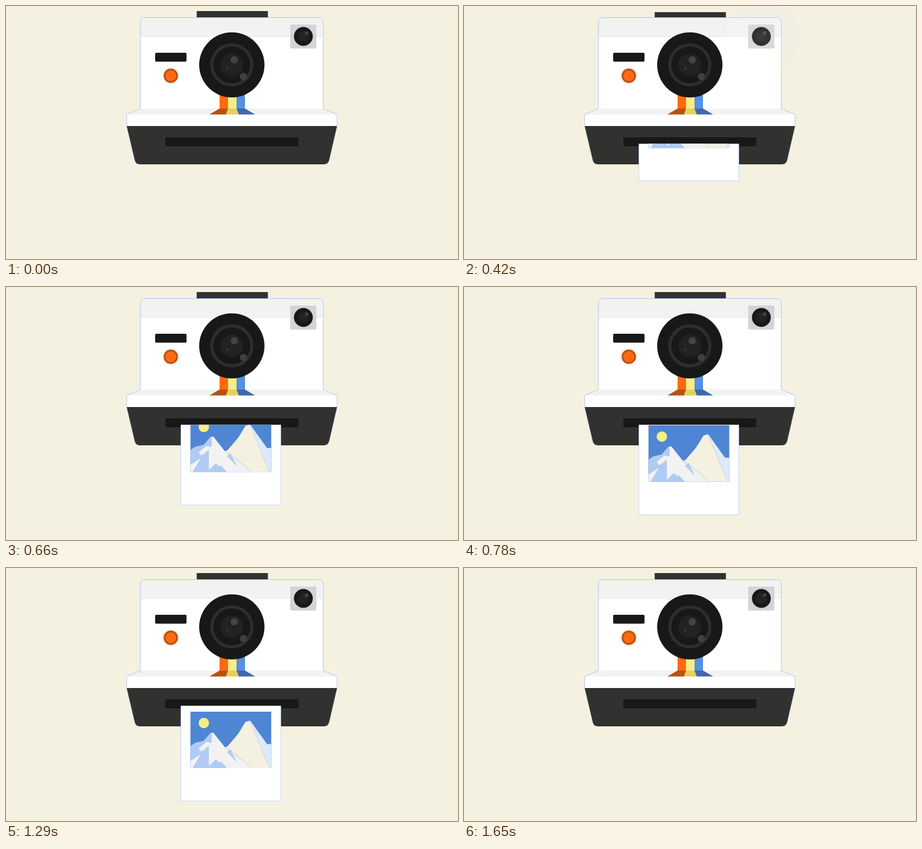
Recreate the animation shown at these times as an HTML page. Size 800 by 449 pixels, loop 2.16 s.

```html
<!DOCTYPE html>
<html lang="en">
<head>
<meta charset="utf-8">
<title>Instant camera</title>
<style>
  html, body { margin: 0; width: 100%; height: 100%; overflow: hidden; background: #f5f1e0; }
  svg { display: block; width: 100%; height: 100%; }
  .dark { fill: #31312f; }
  .black { fill: #181818; }
  .pale { fill: #f2f2f2; }
  .ice { fill: #dfe9fa; }
  .blue { fill: #b0cbf3; }
  .edge { fill: none; stroke: #8fb4f2; stroke-width: .7; }
</style>
</head>
<body>
<svg viewBox="0 0 800 449">
  <defs>
    <clipPath id="exit"><rect x="300" y="244.5" width="200" height="210"/></clipPath>
    <clipPath id="frame"><rect x="326.5" y="18.5" width="143" height="100"/></clipPath>
  </defs>

  <circle id="halo" class="ice" cx="528" cy="54" stroke="#a9c5f5" stroke-width=".7"/>
  <rect id="shutter" class="dark" x="337.5" y="9" width="126" height="16"/>

  <!-- body -->
  <path fill="#fff" d="M238 182V28.500Q238 20.500 246 20.500H553.500Q561.500 20.500 561.500 28.500V182Z"/>
  <path class="pale" d="M238 54.500V28.500Q238 20.500 246 20.500H553.500Q561.500 20.500 561.500 28.500V54.500Z"/>
  <path stroke="#e6ebf6" d="M238 54.500H561.500"/>
  <path class="pale" d="M238 182H561.500L586 192.500H213.500Z"/>
  <path fill="#fff" d="M213.500 192.500H586V213.500H213.500Z"/>
  <path class="dark" d="M213.500 213H586L572.300 272.500Q570.500 281 563 281H236.500Q229 281 227.500 272.500Z"/>
  <path class="edge" d="M213.500 213V192.500L238 182V28.500Q238 20.500 246 20.500H553.500Q561.500 20.500 561.500 28.500V182L586 192.500V213"/>
  <path class="edge" opacity=".6" d="M213.500 213L227.500 272.500Q229 281 236.500 281M586 213L572.300 272.500Q570.500 281 563 281"/>
  <rect class="black" x="282" y="233" width="235.500" height="16" rx="2"/>

  <!-- stripes -->
  <path fill="#ff6a13" d="M378 150h15v32h-15z"/>
  <path fill="#f6ee85" d="M393 150h15v32h-15z"/>
  <path fill="#5590e2" d="M408 150h15v32h-15z"/>
  <path fill="#b9500f" d="M378 182H393L389.500 192.500H360Z"/>
  <path fill="#e6d05d" d="M393 182H408L412 192.500H389.500Z"/>
  <path fill="#3f68ad" d="M408 182H423L441 192.500H412Z"/>

  <!-- controls and lens -->
  <rect class="black" x="264" y="83" width="55.500" height="15.700" rx="2"/>
  <circle fill="#f2f0ea" cx="291.700" cy="123.700" r="15.500"/>
  <circle fill="#c0500f" cx="291.700" cy="123.700" r="12.700"/>
  <circle fill="#ff6a13" cx="291.700" cy="123.700" r="9.500"/>
  <g transform="translate(399.700 104.500)">
    <circle class="black" r="57.800"/>
    <circle fill="#2e2e2e" r="38.300"/>
    <circle class="black" r="32.700"/>
    <circle fill="#222221" r="20"/>
    <circle fill="#444" cx="4.300" cy="-9" r="6.500"/>
    <circle fill="#3f3f3f" cx="20.500" cy="20.700" r="6.500"/>
    <circle fill="#3c3c3c" cx="-8" cy="6.500" r="2"/>
  </g>
  <rect fill="#d4d4d4" x="503" y="33" width="46.300" height="42.500" rx="2"/>
  <g transform="translate(526.300 54)">
    <circle class="black" r="16.700"/>
    <circle fill="#222221" r="10"/>
    <circle fill="#444" cx="6" cy="-6" r="3"/>
    <circle fill="#3a3a3a" cx="1.500" cy="-3" r="1.400"/>
  </g>

  <!-- light over the body only -->
  <clipPath id="front"><path d="M238 182V28.500Q238 20.500 246 20.500H553.500Q561.500 20.500 561.500 28.500V182Z"/></clipPath>
  <g clip-path="url(#front)"><circle id="flash" fill="#fff" cx="528" cy="54"/></g>

  <!-- print, drawn from its own top edge -->
  <g clip-path="url(#exit)">
    <g id="print">
      <rect x="309.500" width="177" height="177" fill="#fff" stroke="#a9c5f5" stroke-width=".7"/>
      <g clip-path="url(#frame)">
        <rect fill="#4f86d4" x="326" y="18" width="144" height="101"/>
        <circle fill="#f6ee85" cx="350.200" cy="38.500" r="9.200"/>
        <path class="ice" d="M431 35L433 35.500L462 76H470V119H460Z"/>
        <path fill="#f5f1e0" d="M424 36.500L431 34.500L434 37L467 119H430L387 82L392 80L410 59L414 53Z"/>
        <path class="blue" d="M326 80L334 74L350 70L362 56H367L388 82L435 119H326Z"/>
        <path class="pale" d="M364 56H367L388 83L435 118.500V119H391.500L380 106.500L377.500 109L371.500 103L359 115V79L346 89.500L341 83.500L355 72L364 74Z"/>
        <path class="pale" d="M326 106.500L345 93.500L330 119H326Z"/>
        <path class="blue" d="M391 90L397.500 86L409 108.500Z"/>
        <path d="M391 83L397 86L435 119M432 36L467 119" fill="none" stroke="#9dbbe6" stroke-width=".6"/>
      </g>
    </g>
  </g>
</svg>
<script>
  const LOOP = 2160, SIZE = 177, GONE = 1635;
  const $ = id => document.getElementById(id);
  const [halo, flash, shutter, print] = ['halo', 'flash', 'shutter', 'print'].map($);
  const clamp = x => Math.min(1, Math.max(0, x));
  const span = (t, from, length) => clamp((t - from) / length);
  const quartOut = x => 1 - (1 - x) ** 4;
  const backIn = (x, s) => (s + 1) * x ** 3 - s * x ** 2;
  const set = (el, attrs) => {
    for (const name in attrs) el.setAttribute(name, attrs[name]);
  };

  function draw(t) {
    const press = 3 * Math.sin(Math.PI * span(t, 0, 540));
    set(shutter, { y: 9 + press });

    const p = span(t, 202, 240);
    const r = 65 * quartOut(p);
    const glow = clamp(1.25 * (1 - p));
    set(halo, { r, opacity: clamp(glow * 1.35) });
    set(flash, { r, opacity: glow });

    // The print slides out, winds back a little, then drops.
    const out = 245.3 + 172.7 * quartOut(span(t, 307, 1016));
    const drop = 107 * backIn(span(t, 1080, 570), 1.08);
    set(print, {
      transform: `translate(0 ${out + drop - SIZE})`,
      visibility: t >= 285 && t < GONE ? 'visible' : 'hidden'
    });
  }

  const start = performance.now();
  function tick() {
    draw((performance.now() - start) % LOOP);
    requestAnimationFrame(tick);
  }
  tick();
</script>
</body>
</html>
```
